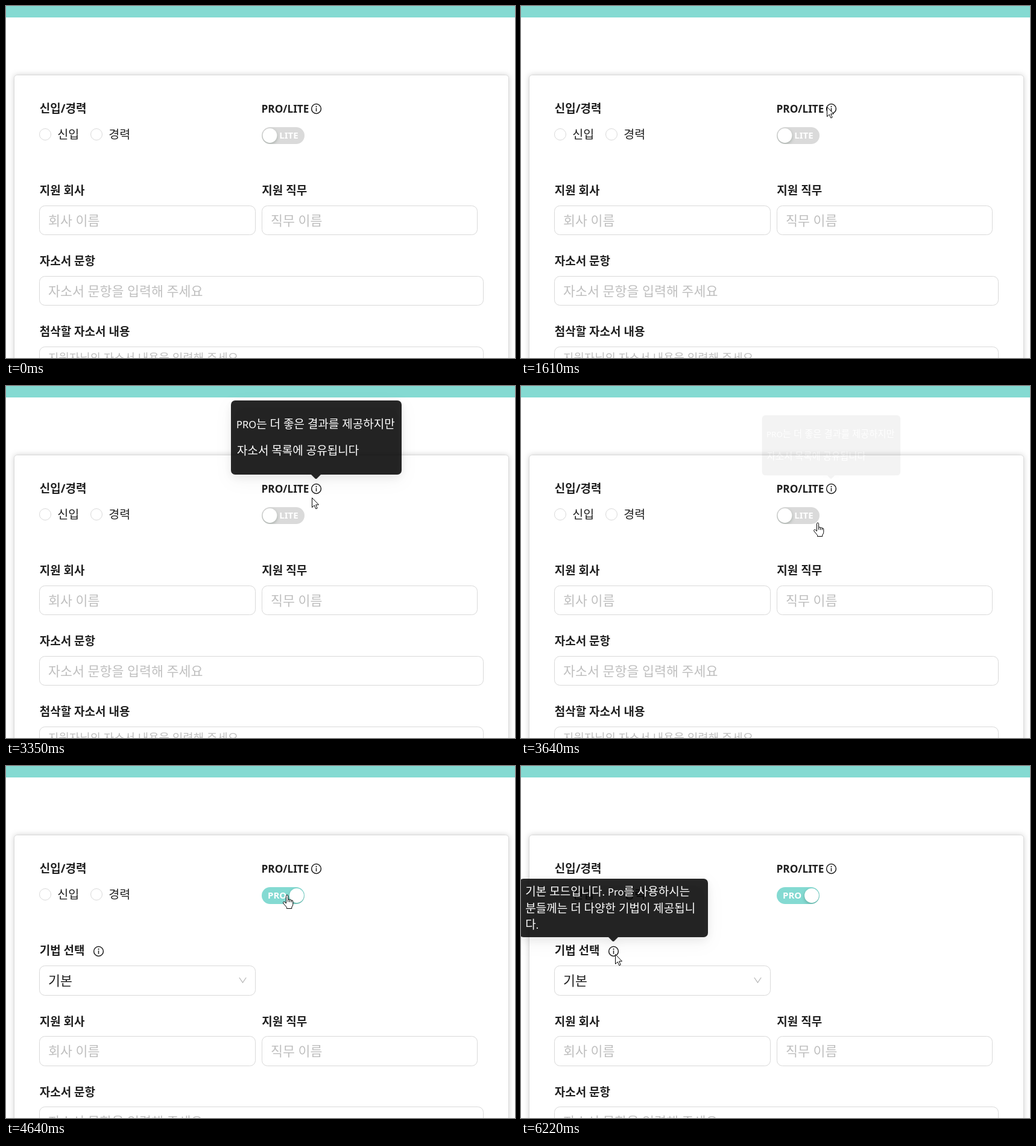
Animation of 844 by 584 pixels, one loop 8000 ms. Source, as an HTML page:

```html
<!DOCTYPE html>
<html lang="ko">
<head>
<meta charset="utf-8">
<title>Form</title>
<style>
  html, body { margin: 0; width: 100%; height: 100%; overflow: hidden; background: #fff; }
  svg { display: block; font-family: "Noto Sans", "Noto Sans CJK KR", "Noto Sans CJK", sans-serif; fill: #1f1f1f; }
  text { white-space: pre; }
  .label { font-size: 19px; font-weight: 700; }
  .latin { font-size: 17.2px; font-weight: 700; }
  .choice { font-size: 19.5px; font-weight: 300; }
  .value { font-size: 21.7px; font-weight: 300; }
  .hint { fill: #bfbfbf; }
  .area { font-size: 18.9px; }
  .box { fill: #fff; stroke: #d9d9d9; }
  .over { stroke: #84dad2; }
  .tip { font-size: 19px; fill: #fff; }
  .tip tspan { font-size: 16.5px; }
  .state { font-size: 15px; font-weight: 700; fill: #fff; }
  .bubble { fill: #000; fill-opacity: .85; }
  .pointer { fill: #fff; stroke: #000; stroke-linejoin: round; }
  .shade { filter: drop-shadow(0 5px 8px rgba(0,0,0,.08)) drop-shadow(0 9px 14px rgba(0,0,0,.05)); }
  #fields.open { transform: translateY(117px); }
  #fields.open text { transform: translateY(.8px); }
  #fields.open .field { height: 49px; }
</style>
</head>
<body>
<svg width="844" height="584" viewBox="0 0 844 584">
  <defs>
    <clipPath id="pill"><rect x="424" y="201" width="71" height="28" rx="14"/></clipPath>
    <g id="info">
      <circle r="7.9" fill="none" stroke="#1f1f1f" stroke-width="1.5"/>
      <circle cy="-3.7" r="1.1"/>
      <path d="M0 -1.3V4.4" stroke="#1f1f1f" stroke-width="1.5"/>
    </g>
  </defs>

  <rect width="844" height="584" fill="#fff"/>
  <rect width="844" height="19" fill="#84dad2"/>
  <rect x="13.5" y="114.5" width="820" height="500" rx="5" fill="#fff" stroke="#d9d9d9"
        style="filter:drop-shadow(0 0 5px rgba(0,0,0,.17))"/>

  <text class="label" x="55.7" y="176.7">신입/경력</text>
  <circle class="box" cx="65" cy="213" r="9.5"/>
  <text class="choice" x="85.3" y="220.4">신입</text>
  <circle class="box" cx="150" cy="213" r="9.5"/>
  <text class="choice" x="170.3" y="220.4">경력</text>

  <text class="latin" x="423.5" y="177">PRO/LITE</text>
  <use href="#info" x="514.5" y="170.5"/>

  <g clip-path="url(#pill)">
    <rect id="track" x="424" y="201" width="71" height="28"/>
    <text id="lite" class="state" y="220">LITE</text>
    <text id="pro" class="state" y="220">PRO</text>
    <circle id="knob" cy="215" r="11.9" fill="#fff" style="filter:drop-shadow(0 2px 2.5px rgba(0,35,11,.25))"/>
  </g>

  <g id="method">
    <text class="label" x="55.7" y="313.3">기법 선택</text>
    <use href="#info" x="153.5" y="307.5"/>
    <rect class="box" x="55.5" y="331.5" width="358" height="49" rx="9"/>
    <text class="value" x="70" y="364">기본</text>
    <path d="M386.8 351L392.5 359.3L398.2 351" fill="none" stroke="#b8b8b8" stroke-width="1.3"/>
  </g>

  <g id="fields">
    <text class="label" x="55.7" y="313.3">지원 회사</text>
    <rect class="box field" x="55.5" y="331.5" width="358" height="48" rx="9"/>
    <text class="value hint" x="70" y="363.6">회사 이름</text>
    <text class="label" x="424.3" y="313.3">지원 직무</text>
    <rect id="job" class="box field" x="424.5" y="331.5" width="357" height="48" rx="9"/>
    <text class="value hint" x="439" y="363.6">직무 이름</text>
    <text class="label" x="55.7" y="430.3">자소서 문항</text>
    <rect id="question" class="box field" x="55.5" y="448.5" width="736" height="48" rx="9"/>
    <text class="value hint" x="70" y="480.6">자소서 문항을 입력해 주세요</text>
    <text class="label" x="55.7" y="547.3">첨삭할 자소서 내용</text>
    <rect class="box" x="55.5" y="565.5" width="736" height="200" rx="9"/>
    <text class="value hint area" x="70" y="590.6">지원자님의 자소서 내용을 입력해 주세요</text>
  </g>

  <g id="tipPro" class="shade">
    <rect class="bubble" x="373" y="24" width="283" height="123" rx="7"/>
    <path class="bubble" d="M506 147H522L515.5 153.5Q514 154.7 512.5 153.5Z"/>
    <text class="tip" x="382" y="69.5"><tspan>PRO</tspan>는 더 좋은 결과를 제공하지만</text>
    <text class="tip" x="383" y="114.3">자소서 목록에 공유됩니다</text>
  </g>
  <g id="tipMethod" class="shade">
    <rect class="bubble" x="-3" y="187" width="313" height="97" rx="7"/>
    <path class="bubble" d="M145 284H161L154.5 290.5Q153 291.7 151.5 290.5Z"/>
    <text class="tip" x="7.3" y="215">기본 모드입니다<tspan>.</tspan> <tspan>Pro</tspan>를 사용하시는</text>
    <text class="tip" x="7.3" y="242.7">분들께는 더 다양한 기법이 제공됩니</text>
    <text class="tip" x="7.3" y="270">다<tspan>.</tspan></text>
  </g>

  <g id="cursor">
    <path id="arrow" class="pointer" d="M.5 .5V16.5L4.2 13L6.8 18.8L9.2 17.8L6.7 12H11.5Z"/>
    <path id="hand" class="pointer" d="M-1.5 12V1.5Q-1.5 0 0 0T1.6 1.5V7.5Q3 6.3 4.4 8Q6 7 7.2 8.8Q9.8 8.2 9.8 11V15.5Q9.8 18 7.8 20V22.5H-.5V20.5L-6 14Q-7 12.2 -5.6 11.3Q-4.2 10.8 -3 12.3L-1.5 14ZM1.6 7.5V11.5M4.4 8V11.8M7.2 8.8V12"/>
    <path id="beam" d="M-3 -8.5H3M0 -8.5V8.5M-3 8.5H3" fill="none" stroke="#000"/>
  </g>
</svg>

<script>
const LOOP = 8000, REFRESH = 66.5;
const APPEAR = 220, OPEN = 4050;
const TEAL = [132, 218, 210], GREY = [218, 218, 218];

// Pointer strokes, each a curve from where the last one ended
const START = { x: 742, y: 517 };
const strokes = [
  { from: APPEAR, to: 610, bend: [670, 415], end: [598, 314] },
  { from: 740, to: 1010, bend: [480, 142], end: [478, 265] },
  { from: 1080, to: 1610, bend: [480, 245], end: [507, 167] },
  { from: 3350, to: 3900, bend: [510, 254], end: [455, 222] },
  { from: 4380, to: 4840, bend: [466, 214], end: [478, 206] },
  { from: 4910, to: 5330, bend: [152, 365], end: [156, 312] }
];

const el = id => document.getElementById(id);
const show = (id, on) => el(id).style.display = on ? "" : "none";
const clamp = v => Math.max(0, Math.min(1, v));
const ramp = (t, start, length) => clamp((t - start) / length);
const ease = v => v * v * (3 - 2 * v);
const mix = (a, b, p) => `rgb(${a.map((v, i) => Math.round(v + (b[i] - v) * p))})`;
const curve = (a, b, c, p) => a * (1 - p) ** 2 + 2 * b * p * (1 - p) + c * p * p;

function pointerAt(t) {
  let { x, y } = START;
  for (const { from, to, bend, end } of strokes) {
    if (t < from) break;
    // The pointer moves only when the screen refreshes
    const steps = Math.round((to - from) / REFRESH) + 1;
    const gap = (to - from) / (steps - 1);
    const p = clamp((Math.floor((t - from) / gap + 1e-6) + 1) / steps);
    x = curve(x, bend[0], end[0], p);
    y = curve(y, bend[1], end[1], p);
  }
  return { x, y };
}

function drawTip(id, level, x, y) {
  const s = .8 + .2 * level;
  show(id, level > 0);
  el(id).setAttribute("opacity", level);
  el(id).setAttribute("transform", `translate(${x} ${y}) scale(${s}) translate(${-x} ${-y})`);
}

function drawSwitch(on) {
  el("track").setAttribute("fill", mix(GREY, TEAL, on));
  el("knob").setAttribute("cx", 437.5 + 44.5 * on);
  el("lite").setAttribute("x", 453.3 + 45 * on);
  el("pro").setAttribute("x", 389 + 45 * on);
}

function drawCursor(t) {
  const { x, y } = pointerAt(t);
  const inside = (l, top, r, b) => t >= APPEAR && x > l && x < r && y > top && y < b;
  const onSwitch = inside(424, 201, 495, 229);
  const onJob = inside(424, 331, 782, 380);
  const onQuestion = inside(55, 448, 792, 497);
  const onInput = onJob || onQuestion;
  el("job").classList.toggle("over", onJob);
  el("question").classList.toggle("over", onQuestion);
  show("cursor", t >= APPEAR);
  show("hand", onSwitch);
  show("beam", onInput);
  show("arrow", !onSwitch && !onInput);
  el("cursor").setAttribute("transform", `translate(${Math.round(x)} ${Math.round(y)})`);
}

function draw(t) {
  show("method", t >= OPEN);
  el("fields").classList.toggle("open", t >= OPEN);
  drawSwitch(ease(ramp(t, OPEN + 45, 200)));
  drawTip("tipPro", ramp(t, 1770, 100) * (1 - ramp(t, 3480, 170)), 514, 154);
  drawTip("tipMethod", ramp(t, 5500, 100), 153, 291);
  drawCursor(t);
}

function tick() {
  draw(performance.now() % LOOP);
  requestAnimationFrame(tick);
}
tick();
</script>
</body>
</html>
```
